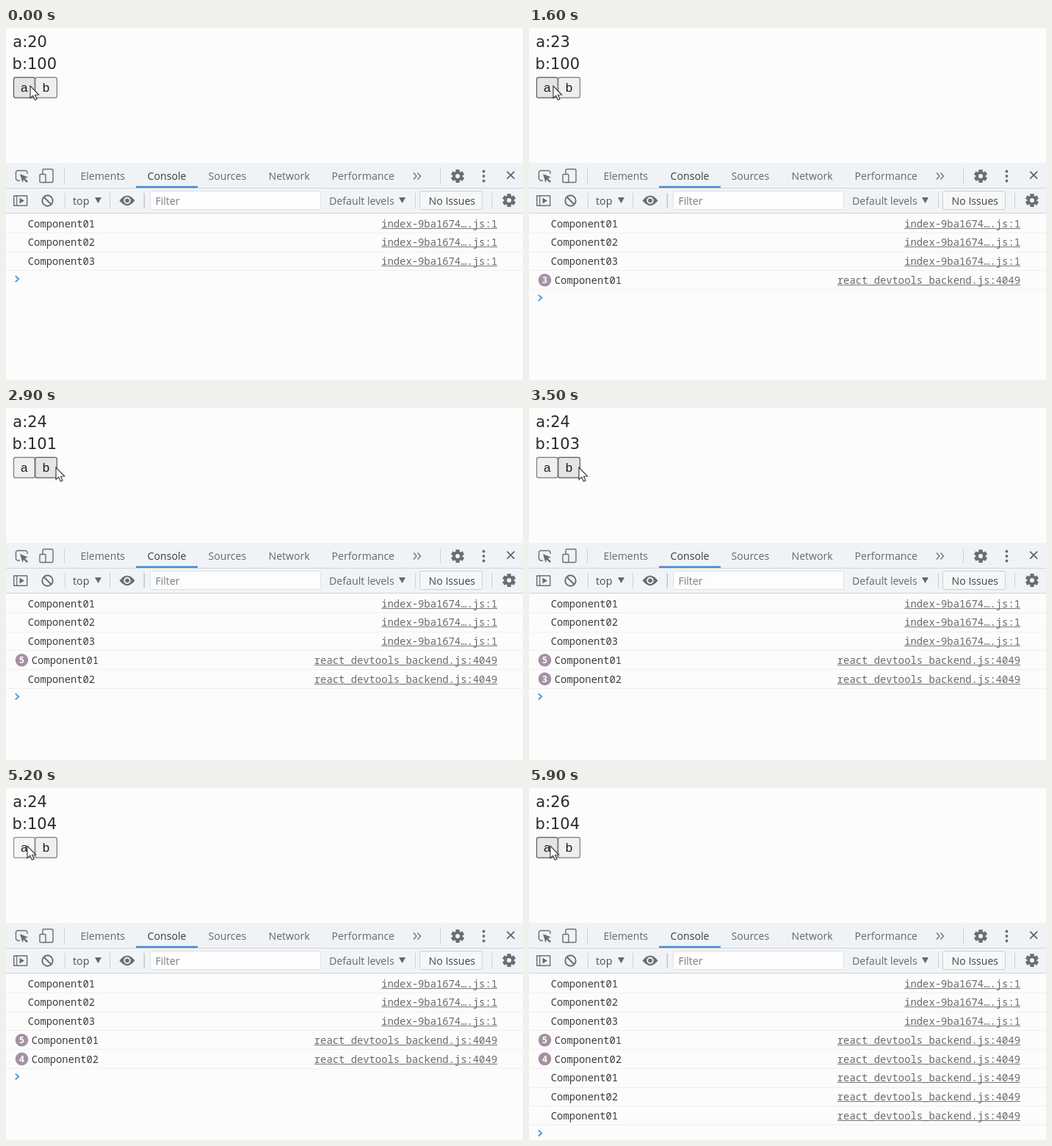
Write an HTML page with a canvas that moves like this. It is 704 px wide and 480 px high and loops after 7000 ms.

```html
<!DOCTYPE html>
<html lang="en">
<head>
<meta charset="utf-8">
<title>Render counter console</title>
<style>
  html, body { margin: 0; width: 100%; height: 100%; overflow: hidden; background: #fcfcfc; }
  canvas { display: block; }
</style>
</head>
<body>
<canvas id="stage" width="704" height="480"></canvas>
<script>
const ctx = document.getElementById('stage').getContext('2d');
const LOOP = 7000;
const UI = '"Open Sans", "Noto Sans", sans-serif';
const MONO = '13.85px "Noto Sans Mono", "DejaVu Sans Mono", monospace';
const PAGE = '21px "DejaVu Sans", sans-serif';
const ICON = '#6b6e71';
const ROW = 25.68;
const BACKEND = 'react_devtools_backend.js:4049';

// Button, press time, release time
const clicks = [
  ['a', 300, 400], ['a', 600, 800], ['a', 1200, 1300], ['a', 1700, 1800],
  ['b', 2500, 2700], ['b', 3000, 3100], ['b', 3400, 3500], ['b', 3700, 3900],
  ['a', 5200, 5300], ['a', 5600, 5800]
];

// Time, x, y, hovered button
const moves = [
  [0, 33, 79, 'a'], [2000, 52, 80, 'b'], [2100, 68, 81, 'b'], [4900, 29, 79, 'a']
];

function stateAt(t) {
  const state = { a: 20, b: 100, pressed: null, logs: [] };
  for (const n of [1, 2, 3]) {
    state.logs.push({ name: 'Component0' + n, file: 'index-9ba1674….js:1', count: 1 });
  }
  const log = name => {
    const last = state.logs[state.logs.length - 1];
    if (last.name === name && last.file === BACKEND) last.count++;
    else state.logs.push({ name, file: BACKEND, count: 1 });
  };
  let prev = 'a';
  for (const [key, down, up] of clicks) {
    if (t >= down && t < up) state.pressed = key;
    if (t < up) break;
    state[key]++;
    // Switching counters renders both components once
    if (key !== prev || key === 'a') log('Component01');
    if (key !== prev || key === 'b') log('Component02');
    prev = key;
  }
  [, state.x, state.y, state.hover] = moves.filter(m => t >= m[0]).pop();
  return state;
}

function rect(x, y, w, h, color) {
  ctx.fillStyle = color;
  ctx.fillRect(x, y, w, h);
}

function text(str, x, y, font, color, align = 'left') {
  ctx.font = font;
  ctx.fillStyle = color;
  ctx.textAlign = align;
  ctx.fillText(str, x, y);
}

function label(str, x, y, color = '#64686c', size = 14.1) {
  text(str, x, y, size + 'px ' + UI, color);
}

function box(x, y, w, h, r, fill, border, width = 1) {
  ctx.beginPath();
  ctx.roundRect(x, y, w, h, r);
  if (fill) { ctx.fillStyle = fill; ctx.fill(); }
  if (border) { ctx.strokeStyle = border; ctx.lineWidth = width; ctx.stroke(); }
}

function trace(points, x = 0, y = 0) {
  ctx.beginPath();
  points.forEach(([px, py]) => ctx.lineTo(x + px, y + py));
}

function line(points, color, width) {
  trace(points);
  ctx.strokeStyle = color;
  ctx.lineWidth = width;
  ctx.stroke();
}

function shape(points, color) {
  trace(points);
  ctx.fillStyle = color;
  ctx.fill();
}

function disc(x, y, r, color) {
  ctx.beginPath();
  ctx.arc(x, y, r, 0, Math.PI * 2);
  ctx.fillStyle = color;
  ctx.fill();
}

function ring(x, y, r, color, width) {
  ctx.beginPath();
  ctx.arc(x, y, r, 0, Math.PI * 2);
  ctx.strokeStyle = color;
  ctx.lineWidth = width;
  ctx.stroke();
}

function gear(x, y, bg) {
  ctx.save();
  ctx.translate(x, y);
  for (let i = 0; i < 6; i++) {
    rect(-2.6, -9, 5.2, 5, ICON);
    ctx.rotate(Math.PI / 3);
  }
  ctx.restore();
  disc(x, y, 6.7, ICON);
  disc(x, y, 3, bg);
}

function divider(x, y) {
  rect(x, y, 1, 20, '#ccd0d4');
}

function caret(x, y) {
  shape([[x, y], [x + 9, y], [x + 4.5, y + 8]], '#64686c');
}

function tabBar() {
  const bg = '#eff3f6';
  rect(0, 184, 704, 34, bg);
  rect(0, 218, 704, 1, '#d0d4d8');

  line([[19, 208], [15.5, 208], [13.5, 206], [13.5, 196], [15.5, 194.5], [27, 194.5], [29, 196], [29, 199]], ICON, 1.4);
  shape([[19, 199], [30, 203.5], [25.8, 205], [30, 209.2], [28.3, 211], [24, 206.8], [22.5, 211]], ICON);
  box(50, 192.5, 14, 18, 1.5, null, ICON, 1.4);
  box(46, 199.5, 8, 11, 1, bg, ICON, 1.4);

  divider(79, 192);
  label('Elements', 101.4, 207);
  label('Console', 192.6, 207, '#383b3e');
  label('Sources', 275.5, 207);
  label('Network', 357.5, 207);
  label('Performance', 443.6, 207);
  rect(177, 215.6, 84, 2.3, '#3c85d8');

  for (const x of [555, 560.5]) {
    line([[x, 197.5], [x + 4, 202], [x, 206.5]], ICON, 1.3);
  }
  divider(591, 192);
  gear(615, 202, bg);
  for (const y of [195.5, 202, 208.5]) disc(650.5, y, 1.9, ICON);
  line([[682.2, 195.7], [692.2, 205.7]], '#606366', 1.7);
  line([[692.2, 195.7], [682.2, 205.7]], '#606366', 1.7);
}

function toolBar() {
  const bg = '#f1f4f6';
  rect(0, 219, 704, 33, bg);
  rect(0, 252, 704, 1, '#d0d4d8');

  box(10.7, 228.7, 18, 13.6, 0.5, null, ICON, 1.4);
  line([[14.7, 228.7], [14.7, 242.3]], ICON, 1.3);
  shape([[18.5, 231.5], [25, 235.5], [18.5, 239.5]], ICON);
  ring(56.5, 235.5, 7.2, ICON, 1.9);
  line([[51.5, 230.5], [61.5, 240.5]], ICON, 1.9);

  divider(80, 225);
  label('top', 91, 240.5, '#4b4e51', 14.3);
  caret(121, 231);
  divider(141, 225);
  ctx.beginPath();
  ctx.moveTo(154.5, 235.3);
  ctx.quadraticCurveTo(165, 221.5, 175.5, 235.3);
  ctx.quadraticCurveTo(165, 249.1, 154.5, 235.3);
  ctx.fillStyle = ICON;
  ctx.fill();
  disc(165, 235.3, 4.7, bg);
  disc(165, 235.3, 2.8, ICON);
  rect(187.5, 225, 1.5, 20, '#bfc3c7');

  box(196.5, 222.5, 232, 25, 1, '#fdfdfd', '#dfe2e5');
  label('Filter', 203.4, 241, '#7a7d80');
  label('Default levels', 440, 240.5, '#64686c', 14.2);
  caret(535, 231);
  divider(557, 225);
  box(563.5, 222.5, 85, 25, 2, '#f5f7f8', '#ccd0d4');
  label('No Issues', 575.6, 240.5, '#414447', 14.1);
  divider(661, 225);
  gear(685, 235, bg);
}

function button(key, x, w, state) {
  const hover = state.hover === key;
  const pressed = state.pressed === key;
  const fill = pressed ? '#f5f5f5' : hover ? '#e4e4e4' : '#efefef';
  const border = pressed ? '#8d8d8d' : hover ? '#5a5a5a' : '#7c7c7c';
  box(x, 67.4, w, 27.8, 2.5, fill, border, 1.2);
  text(key, x + w / 2, 87, '17px "Liberation Sans", Arial, sans-serif', '#1c1c1c', 'center');
}

function page(state) {
  text('a:' + state.a, 9.3, 26, PAGE, '#2a2a2a');
  text('b:' + state.b, 8.6, 56, PAGE, '#2a2a2a');
  button('a', 10.5, 28.7, state);
  button('b', 39.8, 29.6, state);
}

function consoleRows(logs) {
  logs.forEach((entry, i) => {
    const mid = 267.1 + i * ROW;
    const base = Math.round(mid + 4.69);
    const grouped = entry.count > 1;
    rect(0, Math.round(mid + 12), 704, 1, '#f0f0f0');
    if (grouped) {
      disc(21.5, mid - 0.4, 8.8, '#a591a2');
      text(entry.count, 21.5, mid + 4, 'bold 12px ' + UI, '#fff', 'center');
    }
    text(entry.name, grouped ? 34.8 : 29.8, base, MONO, '#3c3c3c');
    text(entry.file, 669, base, MONO, '#6a6a6a', 'right');
    const width = ctx.measureText(entry.file).width;
    rect(669 - width, base + 1, width, 1, '#777');
  });
  const y = 265.2 + logs.length * ROW;
  line([[12.8, y - 4], [17.2, y], [12.8, y + 4]], '#4f9fdd', 2);
}

function cursor(x, y) {
  trace([[0, 0], [0, 16.5], [3.8, 13.2], [6.3, 19], [9, 17.9], [6.6, 12.2], [11.6, 12]], x, y);
  ctx.closePath();
  ctx.fillStyle = '#fff';
  ctx.fill();
  ctx.strokeStyle = '#404040';
  ctx.lineWidth = 1.2;
  ctx.stroke();
}

function draw(t) {
  const state = stateAt(t);
  rect(0, 0, 704, 480, '#fcfcfc');
  page(state);
  tabBar();
  toolBar();
  consoleRows(state.logs);
  cursor(state.x, state.y);
}

const start = performance.now();
function tick() {
  draw((performance.now() - start) % LOOP);
  requestAnimationFrame(tick);
}
tick();
</script>
</body>
</html>
```
